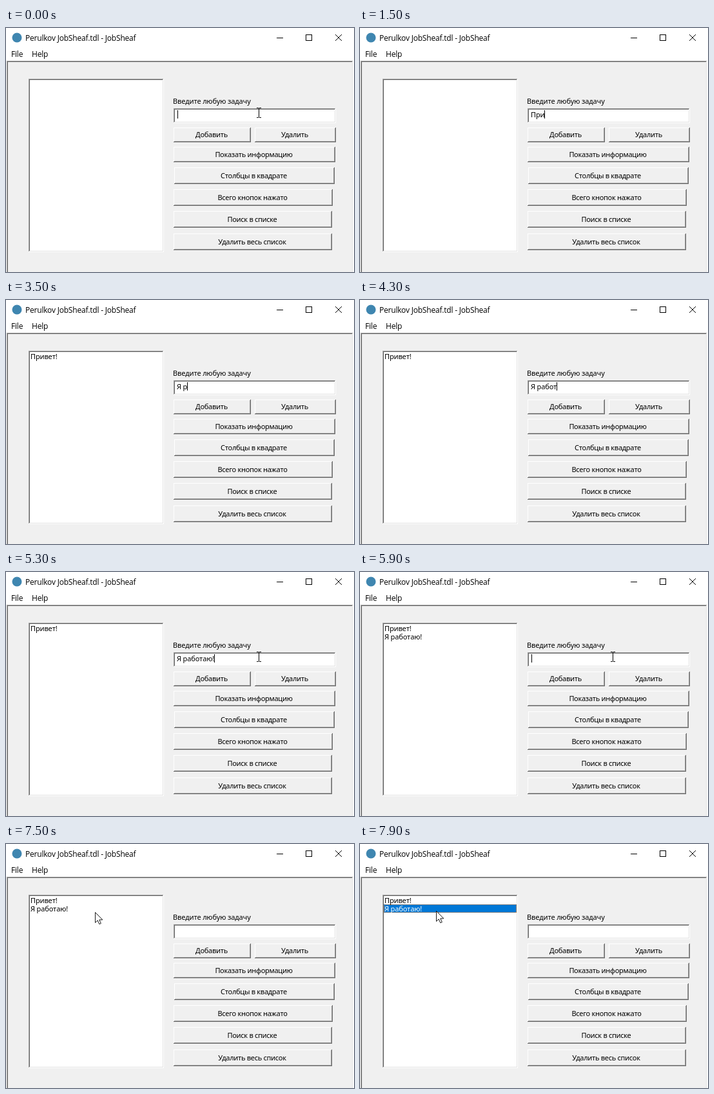
These frames come from a looping animation (540x380 px, 8000 ms). An HTML page:

```html
<!DOCTYPE html>
<html lang="ru">
<head>
<meta charset="utf-8">
<title>JobSheaf</title>
<style>
  html, body { margin: 0; width: 100%; height: 100%; overflow: hidden; background: #fff; }
  svg { display: block; width: 540px; height: 380px; }
  text { font: 11px "Noto Sans", "Open Sans", sans-serif; letter-spacing: -.15px; fill: #000; white-space: pre; }
  .chrome { font: 12px "Open Sans", "Noto Sans", sans-serif; letter-spacing: -.2px; }
  .button { text-anchor: middle; letter-spacing: -.3px; }
  rect, .crisp { shape-rendering: crispEdges; }
</style>
</head>
<body>
<svg viewBox="0 0 540 380">
  <rect width="540" height="380" fill="#fff"/>
  <circle cx="17" cy="15" r="7.5" fill="#3f86b0"/>
  <text class="chrome" x="30" y="20">Perulkov JobSheaf.tdl - JobSheaf</text>
  <text class="chrome" x="8" y="45">File</text>
  <text class="chrome" x="40" y="45">Help</text>
  <g fill="none" stroke="#000">
    <path class="crisp" d="M420 15.5h10M465.5 10.5h9v9h-9z"/>
    <path d="M511 10l10 10M521 10l-10 10"/>
  </g>

  <g id="panel"></g>
  <text x="259" y="118">Введите любую задачу</text>

  <rect id="highlight" x="37" y="94" width="206" height="13" fill="#0078d7"/>
  <rect id="focus" x="37.5" y="94.5" width="205" height="12" fill="none" stroke="#ff8728" stroke-dasharray="1 1"/>
  <text id="row1" x="38" y="92">Привет!</text>
  <text id="row2" x="38" y="105">Я работаю!</text>
  <text id="entry" x="265" y="139"></text>
  <rect id="caret" y="128" width="1" height="13"/>

  <path id="beam" class="crisp" fill="none" stroke="#000" d="M-3 -7.5h3M1 -7.5h3M.5 -7v14M-3 7.5h3M1 7.5h3"/>
  <path id="arrow" fill="#fff" stroke="#000" stroke-width=".9" d="M.5 .5V16.5L4.2 13L6.8 18.8L9.3 17.7L6.8 12H11.8Z"/>
</svg>
<script>
const $ = id => document.getElementById(id);
const LOOP = 8000;

// Two-pixel bevel: outer light and dark edges, then inner ones.
function bevel(x, y, r, b, fill, [a, c, d, e]) {
  const edge = (n, top, low) =>
    `<path class="crisp" fill="none" stroke="${top}" d="M${x + n + .5} ${b - n}V${y + n + .5}H${r - n}"/>` +
    `<path class="crisp" fill="none" stroke="${low}" d="M${x + n} ${b - n - .5}H${r - n - .5}V${y + n}"/>`;
  return `<rect x="${x}" y="${y}" width="${r - x}" height="${b - y}" fill="${fill}"/>` +
    edge(0, a, c) + edge(1, d, e);
}

const FACE = "#f0f0f0";
const RAISED = ["#fff", "#696969", FACE, "#a0a0a0"];
const SUNKEN = ["#a0a0a0", "#fff", "#696969", "#e3e3e3"];

const buttons = [
  ["Добавить", 260, 155, 380, 178, 170],
  ["Удалить", 386, 155, 512, 178, 170],
  ["Показать информацию", 260, 185, 511, 209, 201],
  ["Столбцы в квадрате", 261, 217, 510, 243, 234],
  ["Всего кнопок нажато", 260, 251, 507, 277, 268],
  ["Поиск в списке", 260, 285, 506, 311, 302],
  ["Удалить весь список", 260, 320, 506, 346, 337]
];

$("panel").innerHTML =
  bevel(1, 51, 539, 384, FACE, SUNKEN) +
  bevel(35, 79, 245, 349, "#fff", SUNKEN) +
  bevel(260, 125, 512, 148, "#fff", SUNKEN) +
  buttons.map(([label, x, y, r, b, base]) =>
    bevel(x, y, r, b, FACE, RAISED) +
    `<text class="button" x="${(x + r) / 2 - 1}" y="${base}">${label}</text>`).join("");

const tasks = [
  { text: "Привет!", keys: [1000, 1200, 1400, 1600, 1750, 1950, 2150], enter: 2400 },
  { text: "Я работаю!", keys: [3000, 3200, 3400, 3700, 3900, 4100, 4300, 4500, 4700, 5000], enter: 5700 }
];
const strokes = [0, ...tasks.flatMap(t => [...t.keys, t.enter])];
const BLINK = 530, HIDE = 1000, REVEAL = 5150;
const MOVE = [7000, 7600], CLICK = 7700;
const FROM = [392, 132], TO = [118, 104];

const show = (id, on) => $(id).setAttribute("visibility", on ? "visible" : "hidden");

function draw(t) {
  const task = t < tasks[0].enter ? tasks[0] : tasks[1];
  const typed = t < task.enter ? task.text.slice(0, task.keys.filter(k => k <= t).length) : "";
  const entry = $("entry");
  if (entry.textContent !== typed) entry.textContent = typed;

  const last = strokes.filter(k => k <= t).pop();
  const width = typed ? entry.getComputedTextLength() : 0;
  $("caret").setAttribute("x", Math.max(266, Math.floor(265 + width)));
  show("caret", t < CLICK && Math.floor((t - last) / BLINK) % 2 === 0);

  const picked = t >= CLICK;
  show("row1", t >= tasks[0].enter);
  show("row2", t >= tasks[1].enter);
  show("highlight", picked);
  show("focus", picked);
  $("row2").style.fill = picked ? "#fff" : "#000";

  const p = Math.min(1, Math.max(0, (t - MOVE[0]) / (MOVE[1] - MOVE[0])));
  const ease = p * p * (3 - 2 * p);
  const [x, y] = FROM.map((v, i) => Math.round(v + (TO[i] - v) * ease));
  const overEntry = x > 260 && y > 125;
  const visible = t < HIDE || t >= REVEAL;
  for (const id of ["beam", "arrow"]) $(id).setAttribute("transform", `translate(${x} ${y})`);
  show("beam", visible && overEntry);
  show("arrow", visible && !overEntry);
}

const start = performance.now();
function tick() {
  draw((performance.now() - start) % LOOP);
  requestAnimationFrame(tick);
}
tick();
</script>
</body>
</html>
```
